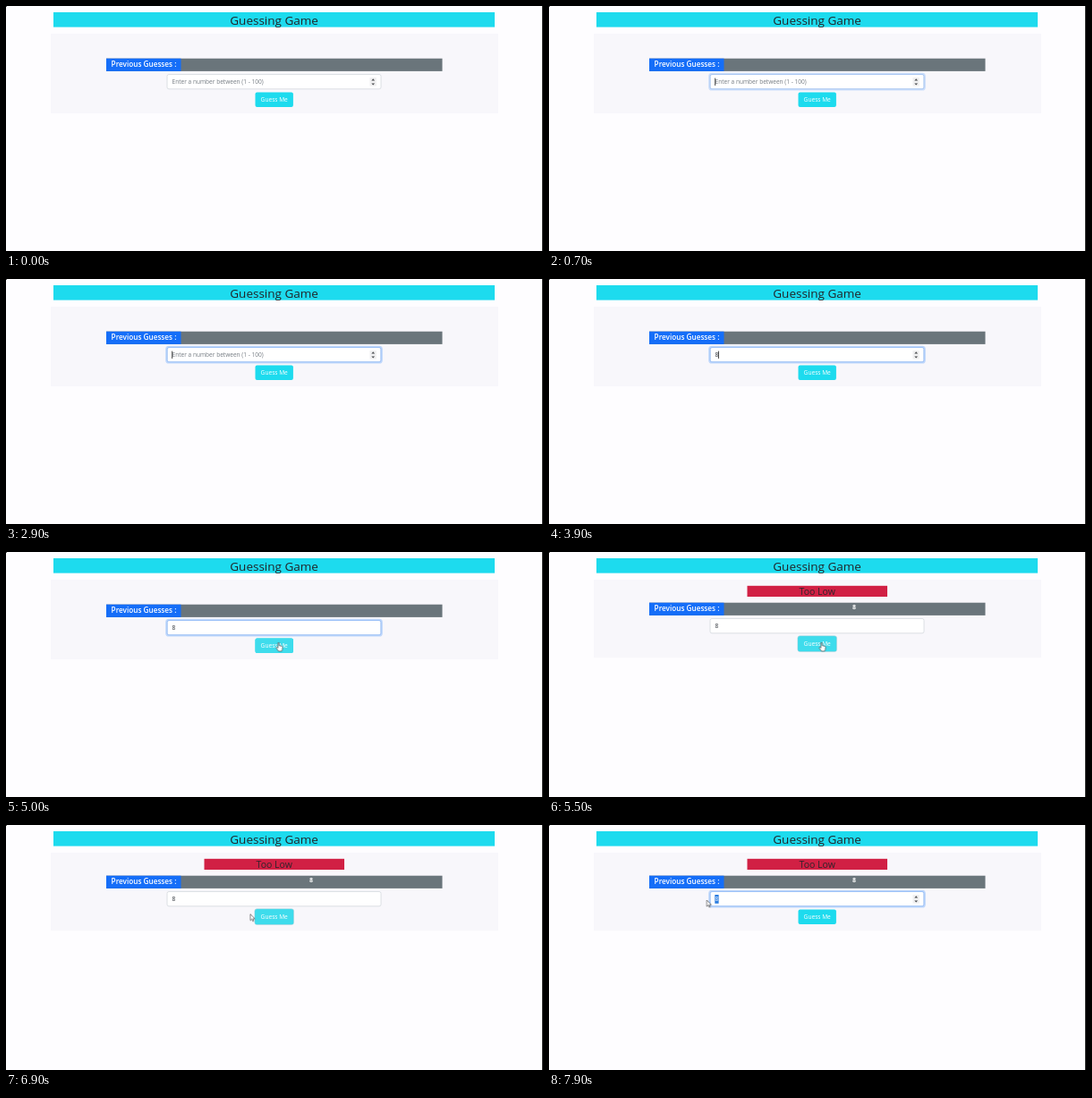
An HTML page for the animation above (8000 ms loop, 600 by 274 pixels).

```html
<!DOCTYPE html>
<html lang="en">
<head>
<meta charset="utf-8">
<title>Guessing Game</title>
<style>
html, body { margin: 0; width: 100%; height: 100%; overflow: hidden; background: #fefdff; }
svg { display: block; width: 100%; height: 100%; font-family: "Open Sans", "Noto Sans", sans-serif; }
.mid { text-anchor: middle; }

/* Everything runs on one 8 s clock: 1% = 80 ms. */
.a { animation: 8s linear infinite; }
.step { animation-timing-function: step-end; }

.form { animation-name: form; }
@keyframes form { 0% { transform: none; } 63.2%, 100% { transform: translateY(-2px); } }
.before { animation-name: before; }
@keyframes before { 0% { opacity: 1; } 63.2%, 100% { opacity: 0; } }
.after { animation-name: after; }
@keyframes after { 0% { opacity: 0; } 63.2%, 100% { opacity: 1; } }

.hint { animation-name: hint; }
@keyframes hint { 0% { opacity: 1; } 42.2%, 100% { opacity: 0; } }
.typed { animation-name: typed; }
@keyframes typed { 0% { opacity: 0; } 42.2%, 100% { opacity: 1; } }
.spin { animation-name: spin; }
@keyframes spin { 0% { opacity: 1; } 51.5% { opacity: 0; } 87.8%, 100% { opacity: 1; } }
.picked { animation-name: picked; }
@keyframes picked { 0% { opacity: 0; } 98.1%, 100% { opacity: 1; } }

.focus { animation-name: focus; }
@keyframes focus {
  0%, 7.3% { opacity: 0; } 9.2%, 63.2% { opacity: 1; }
  65.1%, 89.5% { opacity: 0; } 91.4%, 100% { opacity: 1; }
}
.hover { animation-name: hover; }
@keyframes hover { 0%, 53.6% { opacity: 0; } 55.5%, 89.5% { opacity: 1; } 91.4%, 100% { opacity: 0; } }
.ring { animation-name: ring; }
@keyframes ring { 0%, 63.2% { opacity: 0; } 65.1%, 89.5% { opacity: 1; } 91.4%, 100% { opacity: 0; } }

.caret1 { animation-name: caret1; }
@keyframes caret1 {
  0%, 14.1%, 27.4%, 40.6%, 100% { opacity: 0; }
  7.3%, 20.7%, 34% { opacity: 1; }
}
.caret2 { animation-name: caret2; }
@keyframes caret2 {
  0%, 49.2%, 62.1%, 96.4%, 100% { opacity: 0; }
  42.2%, 55.7%, 89.5% { opacity: 1; }
}

.mouse { animation-name: mouse; }
@keyframes mouse {
  0%, 51.2% { transform: translate(315px, 92px); }
  52.5% { transform: translate(307px, 113px); }
  53.7% { transform: translate(305px, 107px); }
  56%, 73.7% { transform: translate(304.5px, 101px); }
  77.5% { transform: translate(276px, 101px); }
  78.7%, 86.2% { transform: translate(274.5px, 100px); }
  88% { transform: translate(230px, 88px); }
  90%, 96.2% { transform: translate(190px, 83px); }
  98.1%, 100% { transform: translate(176.3px, 84px); }
}
.arrow { animation-name: arrow; }
@keyframes arrow {
  0%, 53.6%, 87.8% { opacity: 0; }
  51.5%, 77.2%, 98.1%, 100% { opacity: 1; }
}
.hand { animation-name: hand; }
@keyframes hand { 0%, 77.2%, 100% { opacity: 0; } 53.6% { opacity: 1; } }
</style>
</head>
<body>
<svg viewBox="0 0 600 274" preserveAspectRatio="none">
  <rect width="600" height="274" fill="#fefdff"/>
  <rect width="1" height="1" fill="#555"/>
  <rect x="599" y="0" width="1" height="274" fill="#1c1c1c"/>

  <rect x="53" y="7" width="493" height="16.6" fill="#1ddbee"/>
  <text class="mid" x="299.6" y="20.8" font-size="13.5" font-weight="500" fill="#20252a">Guessing Game</text>

  <rect x="50" y="31" width="500" height="87.3" fill="#f8f7fb"/>
  <rect class="a step before" x="50" y="118" width="500" height="2" fill="#f8f7fb"/>

  <g class="a step after">
    <rect x="221.5" y="37.8" width="156.5" height="12.2" fill="#d12044"/>
    <text class="mid" x="299.7" y="48.3" font-size="10.5" font-weight="500" fill="#30232b">Too Low</text>
  </g>

  <g class="a step form">
    <rect x="112" y="58.7" width="375.5" height="14.2" fill="#6a757b"/>
    <rect x="112" y="58.7" width="83.5" height="14.2" fill="#156ef8"/>
    <text x="117.6" y="67.6" font-size="8.2" font-weight="600" fill="#fff">Previous Guesses :</text>
    <text class="a step after mid" x="341" y="66.4" font-size="7" font-weight="700" fill="#fff">8</text>

    <rect x="180" y="76.5" width="239" height="16.3" rx="2" fill="#fff" stroke="#d3d8de" stroke-width=".8"/>
    <g class="a focus" fill="none">
      <rect x="179.3" y="75.8" width="240.4" height="17.7" rx="2.6" stroke="#c0d8fb" stroke-width="2.2"/>
      <rect x="180" y="76.5" width="239" height="16.3" rx="2" stroke="#93bdf8" stroke-width=".8"/>
    </g>
    <text class="a step hint" x="185.6" y="87.2" font-size="6.55" fill="#747b82">Enter a number between (1 - 100)</text>
    <text class="a step typed" x="185.6" y="87.2" font-size="6.6" fill="#2b3036">8</text>
    <rect class="a step caret1" x="185.3" y="80.6" width=".8" height="8.4" fill="#222"/>
    <rect class="a step caret2" x="189.2" y="80.6" width=".8" height="8.4" fill="#222"/>
    <g class="a step picked">
      <rect x="185.3" y="80" width="4.3" height="9.8" fill="#2b7de0"/>
      <text x="185.6" y="87.2" font-size="6.6" fill="#fff">8</text>
    </g>
    <g class="a step spin">
      <rect x="406.5" y="80" width="7.3" height="9.6" fill="#f0f0f1"/>
      <path d="M408.3 83.4l1.9-2.2 1.9 2.2zM408.3 86.4l1.9 2.2 1.9-2.2z" fill="#4b4d50"/>
    </g>

    <rect class="a ring" x="277.6" y="95.6" width="44.2" height="18.2" rx="3" fill="#8fd3df"/>
    <rect x="278.5" y="96.5" width="42.4" height="16.4" rx="2" fill="#1ddbee"/>
    <rect class="a hover" x="278.5" y="96.5" width="42.4" height="16.4" rx="2" fill="#3edcec"/>
    <text class="mid" x="299.7" y="107.2" font-size="6.6" fill="#fff">Guess Me</text>
  </g>

  <g class="a mouse" stroke-linejoin="round">
    <path class="a step arrow" d="M0 0v7.2l1.7-1.6 1.1 2.5 1.1-.5-1.1-2.4h2.3z" fill="#fff" stroke="#333" stroke-width=".6"/>
    <path class="a step hand" d="M-.7 .7q.8-1 1.5 0v3l3 .7q.9.3.8 1.3l-.5 2.6-.6 1.6h-3.6l-2.3-3.6q0-1 1-.7l.7.7z" fill="#fff" stroke="#333" stroke-width=".6"/>
  </g>
</svg>
</body>
</html>
```
